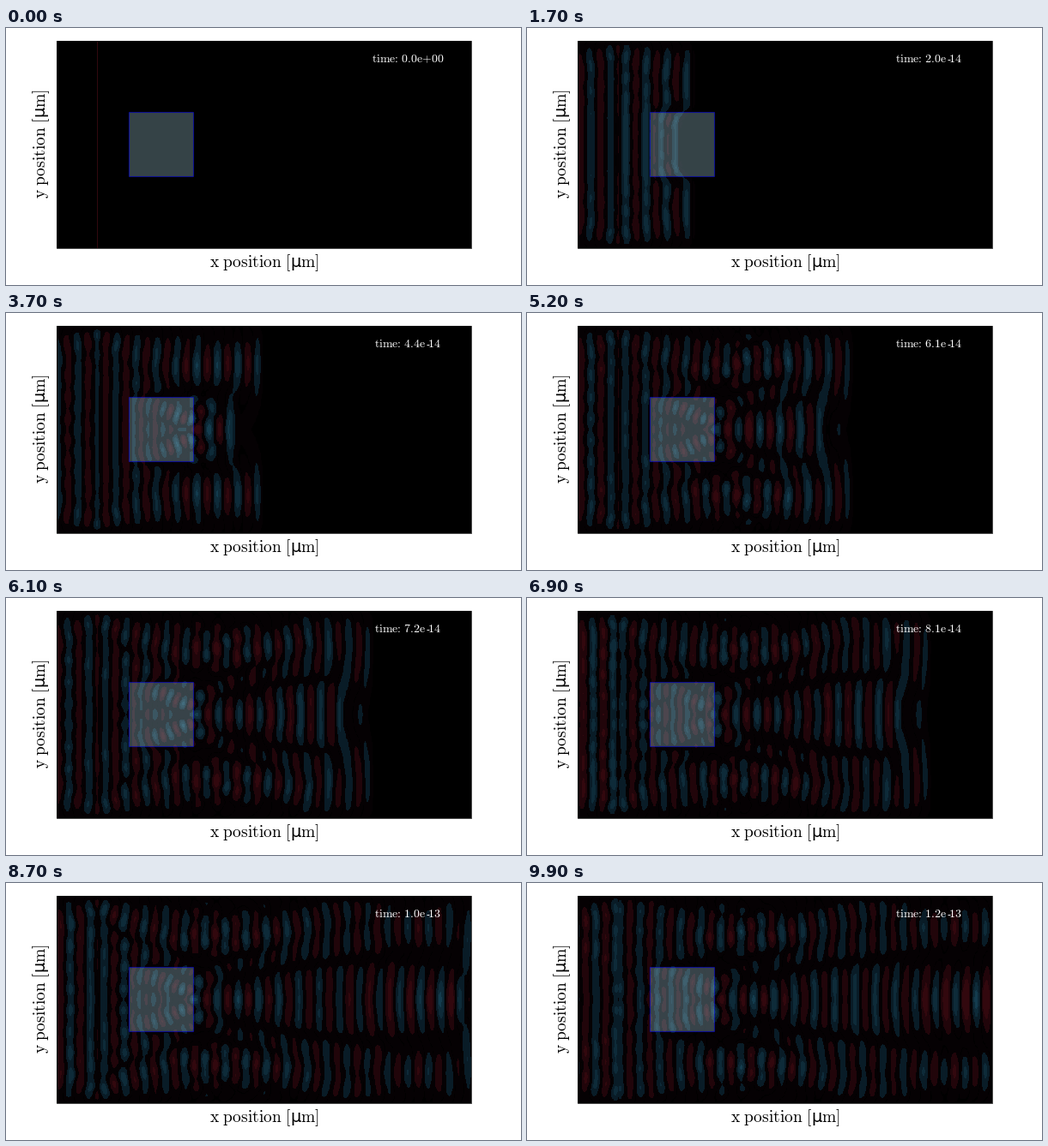
Animation of 600 by 300 pixels, one loop 10000 ms. Source, as a matplotlib script:

```python
import numpy as np
import matplotlib.pyplot as plt
from matplotlib.animation import FuncAnimation
from matplotlib.colors import ListedColormap
from matplotlib.patches import Rectangle

plt.rcParams["mathtext.fontset"] = "cm"
plt.rcParams["font.family"] = "DejaVu Sans"

W, H, DPI = 600, 300, 100
FRAMES, INTERVAL = 100, 100
FRAME_TIME = 1.179e-15      # simulated seconds per frame

# Grid, in cells of 50 nm
NX, NY = 640, 320
PAD = 14                    # hidden part of the absorbing border
EDGE = 24                   # full absorber depth
STEPS = 11                  # time steps per frame
C = 7.0711 / STEPS          # cells per time step
WAVELENGTH = 31
EMITTER_X = 62
BOX = (111, 110, 100)       # x, y, side
EPS = 2.0

LEVELS = [-1.5, -1.0, -0.45, -0.03, 0.03, 0.55, 1.2]
COLORS = np.array([
    (20, 60, 78), (14, 43, 57), (9, 28, 39), (5, 1, 3),
    (0, 0, 0), (5, 1, 3), (33, 5, 10), (50, 8, 14),
]) / 255
RED = 7


def absorber(n):
    i = np.arange(n)
    depth = np.clip(EDGE - np.minimum(i, n - 1 - i), 0, None) / EDGE
    return 0.5 * depth ** 2


def drive(n):
    """Field radiated by the line emitter after n steps."""
    phase = 2 * np.pi * C * n / WAVELENGTH
    return (np.cos(phase) - 0.25) * (1 - np.exp(-(n / 11) ** 2))


def simulate():
    ny, nx = NY + 2 * PAD, NX + 2 * PAD
    damp = np.maximum.outer(absorber(ny), absorber(nx)).astype(np.float32)
    damp = damp[1:-1, 1:-1]
    speed = np.full((ny, nx), C * C, np.float32)
    bx, by, side = BOX
    speed[PAD + by:PAD + by + side, PAD + bx:PAD + bx + side] /= EPS

    gain = speed[1:-1, 1:-1] / (1 + damp)
    keep = (2 / (1 + damp)) - 4 * gain
    back = (1 - damp) / (1 + damp)
    u = np.zeros((ny, nx), np.float32)
    prev = np.zeros_like(u)
    rows = slice(PAD + 5, PAD + NY - 5)

    shots = []
    for n in range(FRAMES * STEPS):
        if n % STEPS == 0:
            view = u[PAD:PAD + NY, PAD:PAD + NX]
            shots.append(np.digitize(view, LEVELS).astype(np.uint8))
        near = u[:-2, 1:-1] + u[2:, 1:-1]
        near += u[1:-1, :-2]
        near += u[1:-1, 2:]
        near *= gain
        near += keep * u[1:-1, 1:-1]
        near -= back * prev[1:-1, 1:-1]
        prev[1:-1, 1:-1] = near
        prev[rows, PAD + EMITTER_X] += 2 * C * (drive(n + 1) - drive(n))
        u, prev = prev, u
    shots[0][:, EMITTER_X] = RED    # the emitter lights up at the start
    return shots


def clock(i):
    mantissa, power = f"{i * FRAME_TIME:.1e}".split("e")
    sign = r"\text{+}" if power[0] == "+" else r"\hspace{0.333}"
    return (rf"$\text{{time:}}\ \text{{{mantissa}e}}{sign}"
            rf"\text{{{power[1:]}}}$")


def axis_label(name):
    return (rf"$\text{{{name}}}\ \text{{position}}\ \text{{[}}$"
            "\u00b5" r"$\text{m]}$")


shots = simulate()

fig = plt.figure(figsize=(W / DPI, H / DPI), dpi=DPI, facecolor="white")
ax = fig.add_axes([0, 0, 1, 1])
ax.axis("off")

field = ax.imshow(shots[0], cmap=ListedColormap(COLORS), vmin=-0.5,
                  vmax=len(COLORS) - 0.5, extent=(59, 542, 256.6, 14.6),
                  interpolation="nearest", aspect="auto")
ax.set_xlim(0, W)
ax.set_ylim(H, 0)
ax.add_patch(Rectangle((59, 14.6), 483, 242, fill=False, ec="black", lw=0.5))
ax.add_patch(Rectangle((142.8, 98.2), 75.6, 75.2, lw=0.8,
                       fc=(0.68, 0.85, 0.9, 0.31), ec=(0, 0, 1, 0.5)))

ax.text(300.5, 279, axis_label("x"), size=14, ha="center", va="baseline")
ax.text(46, 135, axis_label("y"), size=14, ha="center", va="baseline",
        rotation=90, rotation_mode="anchor")
stamp = ax.text(468.5, 40, clock(0), size=10, color="white",
                ha="center", va="baseline")
# short hyphen of the exponent
hyphen, = ax.plot([489.8, 493.2], [36.8, 36.8], color="white", lw=0.7,
                  solid_capstyle="butt")


def update(i):
    field.set_data(shots[i])
    stamp.set_text(clock(i))
    hyphen.set_visible(i > 0)
    return field, stamp, hyphen


anim = FuncAnimation(fig, update, frames=FRAMES, interval=INTERVAL,
                     repeat=True, repeat_delay=0, blit=False)
plt.show()
```
